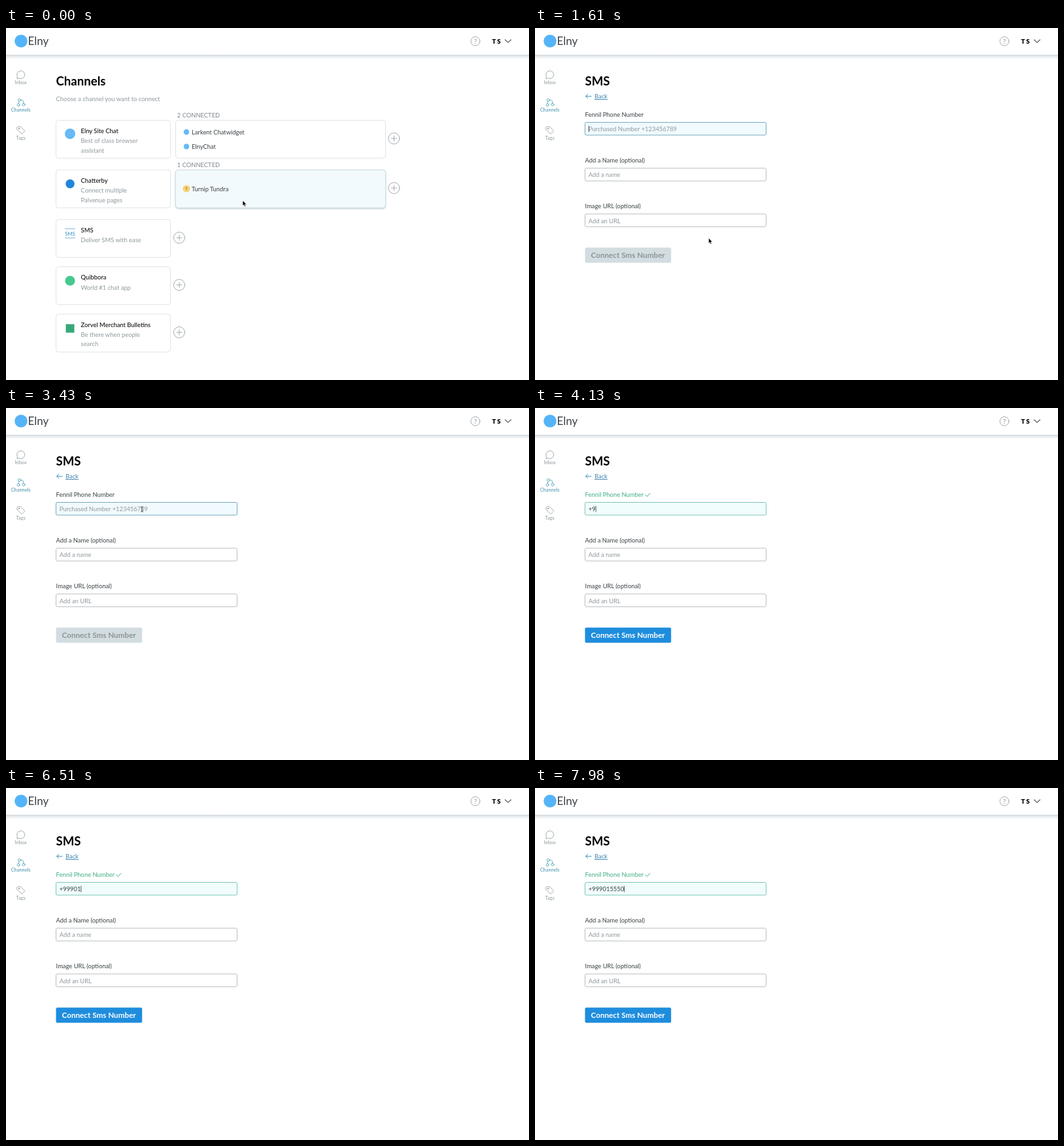
An HTML page for the animation above (8000 ms loop, 800 px wide and 539 px high).

```html
<!DOCTYPE html>
<html lang="en">
<head>
<meta charset="utf-8">
<title>Channels</title>
<style>
  html, body { margin: 0; width: 100%; height: 100%; overflow: hidden; background: #fff; }
  svg { display: block; width: 800px; height: 539px; font: 400 9.4px Lato, sans-serif; }
  .line { fill: none; stroke: #8d989e; stroke-width: .8; stroke-linecap: round; stroke-linejoin: round; }
  .heading { font-size: 18.6px; font-weight: 700; fill: #000; }
  .soft { fill: #8f999e; }
  .caps { fill: #7e898f; }
  .title { font-weight: 500; fill: #111; }
  .item, .label { fill: #3a4145; }
  .nav { font-size: 7.4px; text-anchor: middle; fill: #8d989e; }
  .card { fill: #fff; stroke: #dfe4e6; stroke-width: 1; }
  .card.hover { fill: #f2fafd; stroke: #cfdfe6; filter: drop-shadow(0 1px 1px #b9c6cc); }
  .input { fill: #fff; stroke: #b9bec1; stroke-width: 1; }
  .focus { fill: #f1fafe; stroke: #74abc0; }
  .button { fill: #d3dde1; }
  .buttonText { font-size: 11.7px; font-weight: 700; fill: #8c9699; }
  .tick { stroke: #40ae82; stroke-width: 1; visibility: hidden; }
  .valid .tick { visibility: visible; }
  .valid .phoneLabel { fill: #40ae82; }
  .valid .focus { fill: #f1fdfc; stroke: #7cc6ba; }
  .valid .button { fill: #1f8ddd; }
  .valid .buttonText { fill: #fff; }
</style>
</head>
<body>
<svg viewBox="0 0 800 539">
  <defs>
    <linearGradient id="shade" x2="0" y2="1">
      <stop offset="0" stop-color="#cfd6dc"/>
      <stop offset=".4" stop-color="#e9edf0"/>
      <stop offset="1" stop-color="#fff"/>
    </linearGradient>
  </defs>
  <rect width="800" height="539" fill="#fff"/>
  <rect y="41" width="800" height="7" fill="url(#shade)"/>

  <circle cx="23" cy="20" r="9.8" fill="#55b4f7"/>
  <text x="33.5" y="26" font-size="17" fill="#3c4246">Elny</text>
  <circle class="line" cx="718" cy="20.3" r="6.9"/>
  <text x="718" y="23.7" text-anchor="middle" fill="#7d888e">?</text>
  <text x="743.5" y="23.7" font-size="9.8" font-weight="900" letter-spacing="1.8">TS</text>
  <path class="line" style="stroke:#555;stroke-width:1.1" d="M763.5 18l4.5 4.2 4.5-4.2"/>

  <path class="line" d="M17 77.5l.4-3a6 6 0 1 1 2.4 2.4z"/>
  <text class="nav" x="22.6" y="86.3">Inbox</text>
  <g class="line" style="stroke:#4c9db5">
    <circle cx="20.3" cy="110.3" r="2"/><circle cx="19" cy="117.8" r="2"/><circle cx="27" cy="117.3" r="2"/>
    <path d="M20 112.3l-.7 3.5M22.3 110.5h2.2q1.8 0 2 2v2.6"/>
  </g>
  <text class="nav" x="22.6" y="128.3" style="fill:#4290ab">Channels</text>
  <path class="line" d="M17 152.2q0-1.2 1.2-1.2h4l6 6q.7.7 0 1.4l-3.4 3.4q-.7.7-1.4 0l-6.4-6.2z"/>
  <circle class="line" cx="20" cy="154" r=".9"/>
  <text class="nav" x="22.6" y="170.5">Tags</text>

  <g id="list">
    <text class="heading" x="76.5" y="88.2">Channels</text>
    <text class="soft" x="76.6" y="111.6">Choose a channel you want to connect</text>
  </g>

  <g id="form">
    <text class="heading" x="76.5" y="88.2">SMS</text>
    <path class="line" style="stroke:#4a97c6;stroke-width:1" d="M86 104.5h-8.5m3.4-3.2l-3.4 3.2 3.4 3.2"/>
    <text x="91" y="108" fill="#3f86b0" text-decoration="underline">Back</text>
    <path class="line tick" d="M169 133l2.3 2.5 4.7-5"/>
    <rect class="button" x="76.5" y="336.3" width="131.7" height="23.2" rx="2"/>
    <text class="buttonText" x="85.6" y="352.3">Connect Sms Number</text>
  </g>
  <g id="pointer">
    <path id="arrow" d="M0 0v8.4l1.9-1.7 1.3 3 1.5-.7-1.3-2.8h2.6z" stroke="#fff" stroke-width=".7"/>
    <path id="beam" class="line" style="stroke:#333" d="M-1.6-4q1.6 0 1.6 1v6q0 1-1.6 1M1.6-4Q0-4 0-3M0 3q0 1 1.6 1"/>
  </g>
</svg>
<script>
const LOOP = 8000, STEP = 70;
const OPEN_FORM = 1470, BLINK = 500;
const NUMBER = '+999015550';
const KEY_TIMES = [3640, 4060, 4830, 5320, 5740, 6160, 6650, 7000, 7280, 7560];
const PATH = [[70, 362, 264], [840, 267, 320.5], [1050, 267, 320.5], [1470, 265.5, 321.5],
              [1750, 265.5, 321.5], [3290, 208, 155]];
const INPUT_TOPS = [144.5, 214.7, 284.8];
const $ = id => document.getElementById(id);
const list = $('list'), form = $('form');

function add(parent, tag, attrs, text = '') {
  const el = document.createElementNS('http://www.w3.org/2000/svg', tag);
  for (const [key, value] of Object.entries(attrs)) el.setAttribute(key, value);
  el.textContent = text;
  return parent.appendChild(el);
}
const write = (parent, x, y, text, cls) => add(parent, 'text', { x, y, class: cls }, text);
const dot = (cx, cy, r, fill) => add(list, 'circle', { cx, cy, r, fill });
const box = (parent, x, y, width, height, rx, cls) =>
  add(parent, 'rect', { x, y, width, height, rx, class: cls });

function channel(top, title, lines, plusX) {
  box(list, 76.5, top, 175, 58, 4, 'card');
  write(list, 114.6, top + 19.8, title, 'title');
  lines.forEach((line, i) => write(list, 114.6, top + 35 + i * 14.2, line, 'soft'));
  add(list, 'circle', { cx: plusX, cy: top + 27.8, r: 8.5, class: 'line' });
  add(list, 'path', { d: `M${plusX - 4} ${top + 27.8}h8m-4-4v8`, class: 'line' });
}

function connected(top, count) {
  write(list, 261.8, top - 4, count + ' CONNECTED', 'caps');
  return box(list, 259.5, top, 321, 58, 4, 'card');
}

channel(141.3, 'Elny Site Chat', ['Best of class browser', 'assistant'], 593.5);
channel(217.3, 'Chatterby', ['Connect multiple', 'Palvenue pages'], 593.5);
channel(293.3, 'SMS', ['Deliver SMS with ease'], 265);
channel(365.6, 'Quibbora', ['World #1 chat app'], 265);
channel(438.2, 'Zorvel Merchant Bulletins', ['Be there when people', 'search'], 265);

dot(98, 162, 8, '#66baf6');
dot(98, 238.6, 6.8, '#1f86dc');
add(list, 'text', { x: 98, y: 317.6, 'font-size': 7.6, 'font-weight': 700, 'text-anchor': 'middle', fill: '#62a8d3' }, 'SMS');
add(list, 'path', { d: 'M90.5 307.5h15M90.5 321.5h15', class: 'line', style: 'stroke:#62a8d3' });
dot(98, 387, 7.6, '#45c98f');
add(list, 'rect', { x: 91.5, y: 453.5, width: 13, height: 13, fill: '#36a878' });

connected(141.3, 2);
const hoverBox = connected(217.3, 1);
[['Larkent Chatwidget', 159.3], ['ElnyChat', 181.5]].forEach(([name, y]) => {
  dot(276, y, 4.2, '#66baf6');
  write(list, 284, y + 3.4, name, 'item');
});
dot(276, 246, 5.6, '#f8d27a');
add(list, 'text', { x: 276, y: 248.3, 'font-size': 6, 'font-weight': 700, 'text-anchor': 'middle', fill: '#a5761d' }, 'T');
write(list, 284, 249.5, 'Turnip Tundra', 'item');

const fields = [['Fennil Phone Number', 'Purchased Number +123456789'],
                ['Add a Name (optional)', 'Add a name'],
                ['Image URL (optional)', 'Add an URL']];
const values = fields.map(([label, hint], i) => {
  const top = INPUT_TOPS[i];
  write(form, 76.6, top - 8.4, label, i ? 'label' : 'label phoneLabel');
  box(form, 76.5, top, 277, 19.5, 2, i ? 'input' : 'input focus');
  return write(form, 81.8, top + 13.7, hint, 'soft');
});
const phone = values[0];
const caret = add(form, 'rect', { y: 149.8, width: .8, height: 9.5, fill: '#333' });

function pointerAt(t) {
  const next = PATH.findIndex(point => point[0] > t);
  if (next === 0) return PATH[0].slice(1);
  if (next < 0) return PATH.at(-1).slice(1);
  const [t0, x0, y0] = PATH[next - 1], [t1, x1, y1] = PATH[next];
  const p = (t - t0) / (t1 - t0), eased = p * p * (3 - 2 * p);
  return [x0 + (x1 - x0) * eased, y0 + (y1 - y0) * eased];
}
const show = (el, on) => el.setAttribute('visibility', on ? 'visible' : 'hidden');

function draw(t) {
  const onForm = t >= OPEN_FORM;
  list.style.display = onForm ? 'none' : '';
  form.style.display = onForm ? '' : 'none';

  const [x, y] = pointerAt(t);
  hoverBox.classList.toggle('hover', x > 259 && y > 217 && y < 275.5);
  const overInput = onForm && INPUT_TOPS.some(top => y > top && y < top + 19.5);
  $('pointer').setAttribute('transform', `translate(${x} ${y})`);
  $('pointer').style.display = t < KEY_TIMES[0] ? '' : 'none';
  show($('arrow'), !overInput);
  show($('beam'), overInput);
  if (!onForm) return;

  const typed = KEY_TIMES.filter(time => time <= t).length;
  form.classList.toggle('valid', typed > 0);
  phone.textContent = typed ? NUMBER.slice(0, typed) : fields[0][1];
  phone.setAttribute('class', typed ? 'item' : 'soft');
  const since = t - (typed ? KEY_TIMES[typed - 1] : OPEN_FORM);
  caret.setAttribute('x', 81.8 + (typed ? phone.getComputedTextLength() : 0));
  caret.style.display = since % (2 * BLINK) < BLINK ? '' : 'none';
}

const start = performance.now();
function tick() {
  const t = (performance.now() - start) % LOOP;
  draw(Math.floor(t / STEP) * STEP);
  requestAnimationFrame(tick);
}
tick();
</script>
</body>
</html>
```
